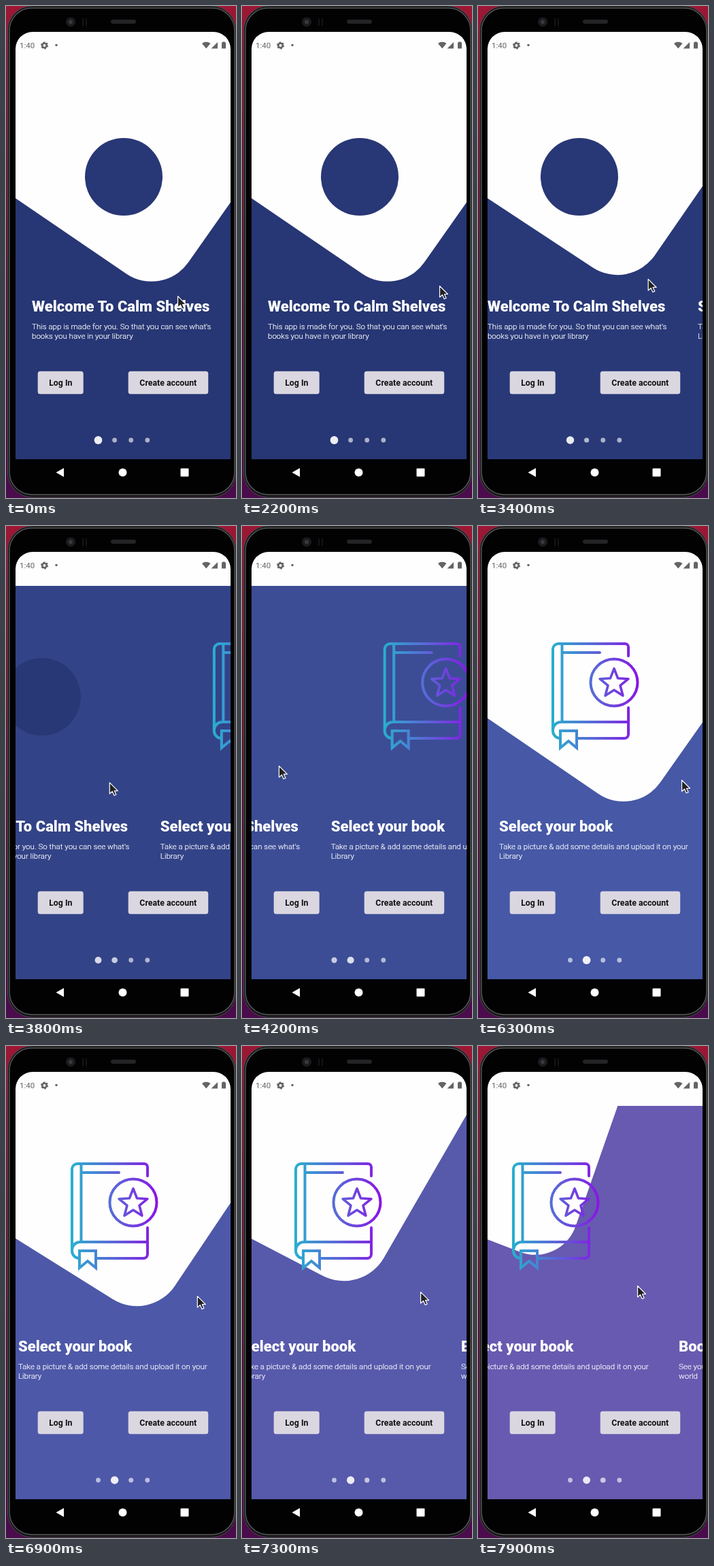
An HTML page for the animation above (8 s loop, 338 by 723 pixels).

```html
<!DOCTYPE html>
<html lang="en">
<head>
<meta charset="utf-8">
<title>Onboarding</title>
<style>
  html, body { margin: 0; width: 100%; height: 100%; overflow: hidden; background: #000; }
  svg { display: block; width: 338px; height: 723px; font-family: Roboto, sans-serif; }
  .title { font-weight: 900; font-size: 22px; fill: #fff; }
  .body { font-weight: 300; font-size: 11.53px; fill: #fff; stroke: #fff; stroke-width: .2; }
  .button { font-weight: 700; font-size: 12.3px; fill: #111; text-anchor: middle; }
</style>
</head>
<body>
<svg viewBox="0 0 338 723">
  <defs>
    <linearGradient id="desk" x2="0" y2="1">
      <stop stop-color="#9c1834"/><stop offset=".5" stop-color="#5c1230"/><stop offset="1" stop-color="#4a0c4c"/>
    </linearGradient>
    <linearGradient id="neon" gradientUnits="userSpaceOnUse" x1="108" y1="0" x2="236" y2="0">
      <stop stop-color="#28b0cf"/><stop offset=".5" stop-color="#5b66d8"/><stop offset="1" stop-color="#8a14e6"/>
    </linearGradient>
    <clipPath id="screen"><rect x="14" y="38" width="316" height="660" rx="25"/></clipPath>
    <clipPath id="content"><path d="M14 88H330V666H14z"/></clipPath>
  </defs>

  <!-- phone -->
  <rect width="338" height="723" fill="url(#desk)"/>
  <rect x="2.500" y="0" width="335.500" height="722" rx="36" fill="#141416" stroke="#4a4b4f"/>
  <rect x="5" y="3" width="331" height="715" rx="33" fill="#020203" stroke="#55565a" stroke-width="1.500"/>
  <rect x="154" y="20" width="37" height="6" rx="3" fill="#242427"/>
  <circle cx="95" cy="23.500" r="7" fill="#1b1b1e"/>
  <circle cx="95" cy="23.500" r="3" fill="#39393f"/>
  <path d="M113 18v11M118 18v11" stroke="#141416" stroke-width="2"/>

  <g clip-path="url(#screen)">
    <path d="M14 38H330V88H14z" fill="#fffefe"/>
    <path id="page" d="M14 88H330V666H14z"/>
    <path id="wedge" fill="#fffefe" clip-path="url(#content)"/>
  </g>

  <!-- status bar -->
  <g fill="#646464">
    <text x="20" y="62" font-size="11.5">1:40</text>
    <circle cx="56.500" cy="58" r="3.200" fill="none" stroke="#646464" stroke-width="2.600"/>
    <circle cx="56.500" cy="58" r="4.800" fill="none" stroke="#646464" stroke-width="1.500" stroke-dasharray="2.500 2.530"/>
    <circle cx="74" cy="57.500" r="1.700"/>
    <path d="M288 55q6-4.500 12.500 0L294.200 62.500zM301.500 62.500L311 53V62.500z"/>
    <path d="M317 53.500h1.500v-1h3v1H323v9h-6z"/>
  </g>

  <!-- swiped pages -->
  <g clip-path="url(#content)"><g id="pager">
    <g>
      <circle cx="173" cy="251" r="57" fill="#283775"/>
      <text class="title" x="38" y="449">Welcome To Calm Shelves</text>
      <text class="body" x="38" y="475">This app is made for you. So that you can see what's</text>
      <text class="body" x="38" y="489">books you have in your library</text>
    </g>
    <g transform="translate(316)">
      <g fill="none" stroke="url(#neon)" stroke-width="4" stroke-linecap="round" stroke-linejoin="round">
        <path d="M221 191V178a5 5 0 0 0-5-5H118a8 8 0 0 0-8 8V301a11 11 0 0 0 10 11M110 300a12 12 0 0 1 12-12H221M123.500 173V288M124 186H179M145 312H215a6 6 0 0 0 6-6V267"/>
        <path d="M121 301H145V326L133 316L121 326z" stroke-linejoin="miter"/>
        <circle cx="200" cy="230" r="34.500"/>
        <path id="star" stroke-width="3.600"/>
      </g>
      <text class="title" x="31" y="449">Select your book</text>
      <text class="body" x="31" y="475">Take a picture &amp; add some details and upload it on your</text>
      <text class="body" x="31" y="489">Library</text>
    </g>
    <g transform="translate(632)">
      <text class="title" x="37" y="449">Book world</text>
      <text class="body" x="37" y="475">See your books from all over the</text>
      <text class="body" x="37" y="489">world</text>
    </g>
  </g></g>

  <!-- fixed controls -->
  <g fill="#dad7e1">
    <rect x="46.700" y="536.700" width="67" height="33.500" rx="3.500"/>
    <rect x="179.700" y="536.700" width="117.500" height="33.500" rx="3.500"/>
  </g>
  <text class="button" x="80.300" y="558">Log In</text>
  <text class="button" x="238.300" y="558">Create account</text>
  <g id="dots" fill="#fff"></g>
  <g fill="#fff">
    <path d="M85 679V692L73.500 685.500z"/>
    <circle cx="171.500" cy="685.500" r="6"/>
    <rect x="256.500" y="679.500" width="12" height="12" rx="1"/>
  </g>

  <path id="cursor" d="M0 0V16.500L4 13L6.700 19L9.600 17.700L7 12H12z" fill="#222" stroke="#fff" stroke-width="1.200" stroke-linejoin="round"/>
</svg>

<script>
const LOOP = 8000, STEP = 100, PAGE = 316;
const COLORS = [[39, 54, 116], [70, 88, 166], [248, 98, 222]];

const el = id => document.getElementById(id);
const lerp = (a, b, k) => a + (b - a) * k;
const ramp = (t, from, to) => Math.min(1, Math.max(0, (t - from) / (to - from)));
const easeOut = k => 1 - (1 - k) ** 3;

// Drag to the second page, let go so it settles, then drag on slowly.
const scrollAt = t =>
  262 * ramp(t, 3300, 4390) +
  54 * easeOut(ramp(t, 5300, 5900)) +
  62.5 * ramp(t, 6610, 8000);

const cursorStart = { x: 252, y: 426 };
const cursorMoves = [
  { from: 300, to: 700, x: 284, y: 415 },
  { from: 1600, to: 1700, x: 290, y: 411 },
  { from: 3235, to: 4400, x: 5, y: 340 },
  { from: 4800, to: 6100, x: 293, y: 366 },
  { from: 6200, to: 6300, x: 299, y: 373 },
  { from: 6510, to: 7900, x: 234, y: 352 }
];
const cursorAt = t => cursorMoves.reduce((p, move) => {
  const k = ramp(t, move.from, move.to);
  return { x: lerp(p.x, move.x, k), y: lerp(p.y, move.y, k) };
}, cursorStart);

// White corner with a rounded tip that swings left and away as `p` goes from 0 to 1.
function wedgePath(p) {
  if (p >= 1) return '';
  const left = [14, 282.5 + 3 * p];
  const tip = [230.5 - 200 * p, 430 - 268 * p + 141 * p * p];
  const top = [471 - 490 * p, 88];
  const toward = end => {
    const dx = end[0] - tip[0], dy = end[1] - tip[1], length = Math.hypot(dx, dy);
    return { x: dx / length, y: dy / length, length };
  };
  const a = toward(left), b = toward(top);
  const reach = Math.min(65, a.length * .8);
  const radius = reach * Math.tan(Math.acos(a.x * b.x + a.y * b.y) / 2);
  const at = d => `${tip[0] + d.x * reach} ${tip[1] + d.y * reach}`;
  return `M14 88L${left}L${at(a)}A${radius} ${radius} 0 0 0 ${at(b)}L${top}z`;
}

const starPoints = Array.from({ length: 10 }, (_, i) => {
  const angle = (i / 5 - .5) * Math.PI, r = i % 2 ? 9.5 : 22;
  return [200 + r * Math.cos(angle), 231.5 + r * Math.sin(angle)];
});
el('star').setAttribute('d', `M${starPoints.join('L')}z`);

const dots = Array.from({ length: 4 }, (_, i) => {
  const dot = document.createElementNS('http://www.w3.org/2000/svg', 'circle');
  dot.setAttribute('cx', 135.5 + 24.1 * i);
  dot.setAttribute('cy', 638);
  return el('dots').appendChild(dot);
});

function draw(t) {
  const scroll = scrollAt(t), position = scroll / PAGE;
  el('pager').setAttribute('transform', `translate(${-scroll})`);

  const page = Math.min(1, Math.floor(position));
  const color = COLORS[page].map((c, i) => Math.round(lerp(c, COLORS[page + 1][i], position - page)));
  el('page').setAttribute('fill', `rgb(${color})`);

  // The backdrop trails the pages slightly.
  const offset = scrollAt(t - 84) % PAGE;
  el('wedge').setAttribute('d', wedgePath(Math.min(1, Math.min(offset, PAGE - offset) / 100)));

  dots.forEach((dot, i) => {
    const active = Math.max(0, 1 - Math.abs(position - i));
    dot.setAttribute('r', lerp(3.4, 5.9, active));
    dot.setAttribute('opacity', lerp(.62, .92, active));
  });

  const { x, y } = cursorAt(t);
  el('cursor').setAttribute('transform', `translate(${x + .5} ${y + .5})`);
  el('cursor').setAttribute('visibility', t >= 4800 && t < 6100 ? 'hidden' : 'visible');
}

const start = performance.now();
function tick() {
  const elapsed = (performance.now() - start) % LOOP;
  draw(Math.floor(elapsed / STEP) * STEP);
  requestAnimationFrame(tick);
}
tick();
</script>
</body>
</html>
```
